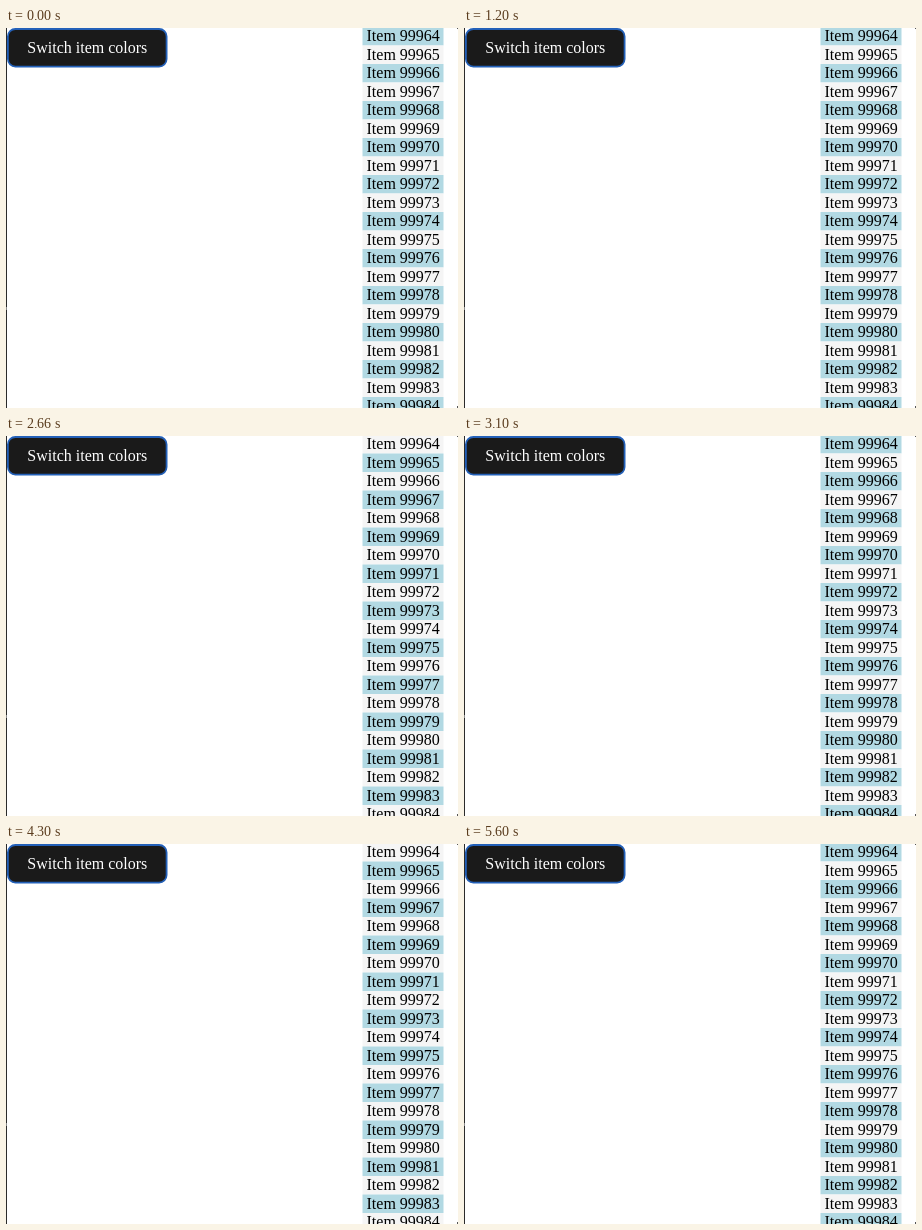
These frames come from a looping animation (452 by 380 pixels, 6.4 s). An HTML page with a canvas:

```html
<!DOCTYPE html>
<html lang="en">
<head>
<meta charset="utf-8">
<title>Switch item colors</title>
<style>
  html, body { margin: 0; width: 100%; height: 100%; overflow: hidden; background: #fff; }
  canvas { display: block; width: 452px; height: 380px; }
</style>
</head>
<body>
<canvas id="stage"></canvas>
<script>
const W = 452, H = 380, LOOP = 6400;
const SWITCHES = [300, 1200, 2000, 3100, 4300, 5600];
const FIRST = 99964, ROWS = 21, PITCH = 18.5, TOP = -1;
const BLUE = '#b2d9e3', PALE = '#f5f5f5';

const canvas = document.getElementById('stage');
const ratio = window.devicePixelRatio || 1;
canvas.width = W * ratio;
canvas.height = H * ratio;
const ctx = canvas.getContext('2d');
ctx.scale(ratio, ratio);
ctx.font = '16px "Liberation Serif", "Times New Roman", serif';
ctx.textBaseline = 'alphabetic';

function rect(x, y, w, h, color) {
  ctx.fillStyle = color;
  ctx.fillRect(x, y, w, h);
}

function label(text, x, y, color) {
  ctx.fillStyle = color;
  ctx.fillText(text, x, y);
}

function drawButton() {
  ctx.beginPath();
  ctx.roundRect(1.9, 1, 158.7, 37.6, 7.5);
  ctx.fillStyle = '#1a1a1a';
  ctx.fill();
  ctx.lineWidth = 1.8;
  ctx.strokeStyle = '#2360b8';
  ctx.stroke();
  label('Switch item colors', 21.3, 25, '#fff');
}

// Dark window edge on the left and the tips of its right corners.
function drawEdges() {
  rect(0, 0, 1, H, '#2b2b2b');
  rect(0, 279, 1, 3, '#8a8a8a');
  rect(W - 1, 0, 1, 1, '#555');
  rect(W - 1, H - 2, 1, 2, '#555');
}

function drawItems(swapped) {
  for (let i = 0; i < ROWS; i++) {
    const y = TOP + i * PITCH;
    const blue = (i % 2 === 0) !== swapped;
    rect(356.5, y, 81, PITCH, blue ? BLUE : PALE);
    label('Item ' + (FIRST + i), 360.5, y + 14.3, '#000');
  }
}

function draw(time) {
  const t = time % LOOP;
  const count = SWITCHES.filter(s => t >= s).length;
  rect(0, 0, W, H, '#fff');
  drawEdges();
  drawButton();
  drawItems(count % 2 === 1);
}

const start = performance.now();
function tick() {
  draw(performance.now() - start);
  requestAnimationFrame(tick);
}
tick();
</script>
</body>
</html>
```
